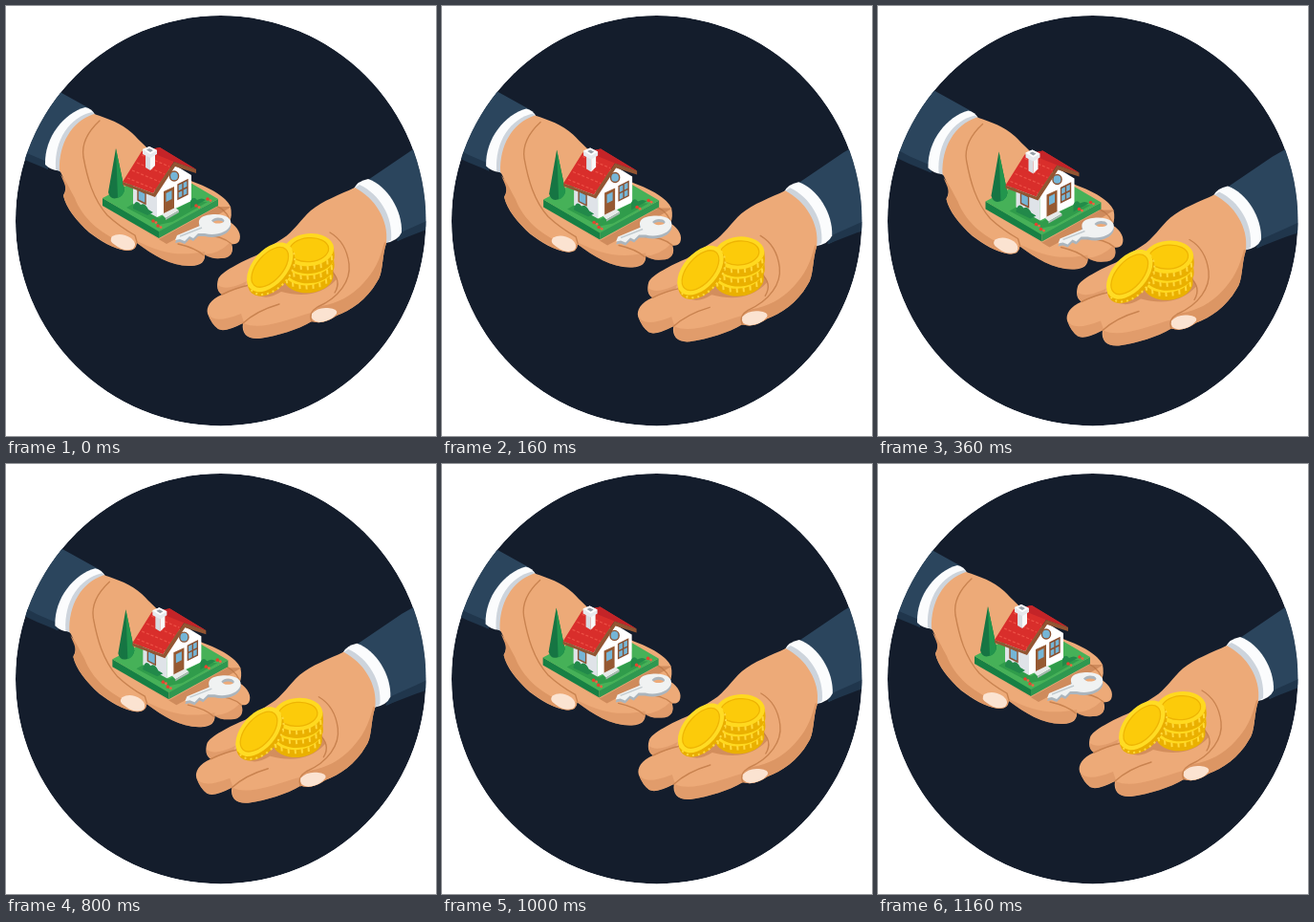
An HTML page for the animation above (1680 ms loop, 450 px wide and 450 px high).

```html
<!DOCTYPE html>
<html lang="en">
<head>
<meta charset="utf-8">
<title>House for coins</title>
<style>
  html, body { margin: 0; width: 100%; height: 100%; overflow: hidden; background: #fff; }
  svg { display: block; width: 100%; height: 100%; }
  .skin { fill: #edaa78; }
  .shade { fill: #dc9664; }
  .crease { fill: none; stroke: #c98350; stroke-width: 1.4; stroke-linecap: round; stroke-linejoin: round; }
  .nail { fill: #fbe3d1; }
  .sleeve { fill: #2b455d; }
  .fold { fill: #20364c; }
  .cuff { fill: #fbfcfd; }
  .cuff-in { fill: #cdd4dc; }
  .glass { fill: #75b5d6; stroke: #8a5030; stroke-width: 1.4; }
</style>
</head>
<body>
<svg viewBox="0 0 450 450">
  <defs>
    <clipPath id="disc"><circle cx="224.7" cy="224.7" r="214.7"/></clipPath>
    <g id="flat">
      <path d="M-26 0V8A26 17 0 0 0 26 8V0Z" fill="#eab000"/>
      <path d="M-23 13v4M-17 16v5M-10 19v5M-3 20v5M4 20v5M11 19v5M18 16v5M23 12v5" transform="translate(0 -4)" stroke="#ffd83a" stroke-width="2"/>
      <ellipse rx="26" ry="17" fill="#ffd91f"/>
      <ellipse rx="20.5" ry="12.5" fill="#fccb0a" stroke="#eeb403" stroke-width="1.3"/>
    </g>
    <g id="flower"><circle r="1.8" fill="#e5432f"/><circle cx="3" cy="1.6" r="1.4" fill="#f26440"/></g>
  </defs>

  <g clip-path="url(#disc)">
    <circle cx="224.7" cy="224.7" r="214.7" fill="#141d2c"/>

    <g id="seller">
      <path class="sleeve" d="M20 70L60 92 87 107C61 116 45 140 44 171L22 160 -6 145Z"/>
      <path class="fold" d="M-6 139L22 154 43 163 44 171 22 162 -6 149Z"/>
      <path class="cuff" d="M83 106C61 112 40 137 41 166Q48 173 57 172L94 115Q90 107 83 106Z"/>
      <path class="cuff-in" d="M90 111C67 116 50 140 52 171L58 174 96 116Z"/>
      <path class="skin" d="M92 113C107 118 120 122 132 133C148 149 172 174 196 184C213 190 231 200 235 210Q237 219 234 226C243 231 247 240 244 246Q241 250 236 249C239 256 236 264 225 264Q215 265 208 260C209 267 204 272 194 272C174 273 154 261 137 248Q136 257 126 256C112 254 99 246 87 237C75 226 62 211 60 198C65 190 61 181 56 172C55 145 68 121 92 113Z"/>
      <path class="shade" d="M57 176C61 186 65 191 60 199C65 215 79 231 92 240C104 249 119 256 128 256Q136 255 137 247Q129 251 119 246C99 238 80 222 72 201C66 190 63 183 57 176Z"/>
      <path class="shade" d="M137 246C160 257 178 263 208 257Q210 270 194 272C174 273 154 261 137 248ZM207 260Q222 260 235 247Q241 264 225 264Q214 265 207 260Z" opacity=".65"/>
      <path class="crease" d="M98 120C85 132 79 145 81 158C85 180 91 202 106 219Q119 231 135 240L137 247M180 249Q198 253 207 261M207 240Q226 240 236 249M214 207Q228 210 234 223"/>
      <path class="nail" d="M111 241Q120 236 131 243Q138 249 133 254Q124 258 114 250Q107 246 111 241Z"/>

      <path d="M103 210L160 244 221 210 236 210 200 232 168 249Z" fill="#b87345" opacity=".55"/>
      <path d="M101 201L160 235V243L101 209Z" fill="#178044"/>
      <path d="M160 235L222 202V209L160 243Z" fill="#2f9850"/>
      <path d="M101 201L164 168 222 202 160 236Z" fill="#46b158"/>
      <path d="M133 207L160 222 194 204 211 205 174 226 160 229 126 211Z" fill="#309c4b"/>
      <path d="M115 149L107 195Q109 203 116 201Q123 199 124 192Z" fill="#167543"/>
      <path d="M115 149L117 201Q123 199 124 192Z" fill="#22954d"/>

      <path d="M133 183L158 194V221L133 207Z" fill="#dfe3e8"/>
      <path d="M158 194L176 166 194 177V204L158 221Z" fill="#fff"/>
      <path class="glass" d="M138 192L146 196V207L138 203Z"/>
      <path d="M165 194L176 189V213L165 218Z" fill="#965932"/>
      <path d="M167.5 196L173.5 193V202L167.5 205Z" fill="#75b5d6"/>
      <path class="glass" d="M180 187L190 182V197L180 202ZM185 184.500V199.500M180 194.500L190 189.500"/>
      <ellipse class="glass" cx="176" cy="178" rx="4.600" ry="5"/>
      <path d="M163 218L177 211 181 214 167 222Z" fill="#e7e9e9"/>
      <path d="M167 222L181 214V216L167 224Z" fill="#aeb8b5"/>

      <path d="M122 184L142 152 161 148 199 171 176 163 154 196Z" fill="#d92e2b"/>
      <path d="M161 148L199 171 176 163 146 151Z" fill="#c42428"/>
      <path d="M127 180L156 192M132 172L161 184M137 164L166 176M142 156L171 168" stroke="#ed5146" stroke-width="1.2" stroke-dasharray="3 2"/>
      <path d="M122 184L154 196 176 163 199 171 199 175 177 168 156 200 122 187Z" fill="#925532"/>
      <path d="M146 154L151 157V172L146 169Z" fill="#d8dce1"/>
      <path d="M151 157L156 154V167L151 172Z" fill="#f8f8f8"/>
      <path d="M143 150L150 147 158 151V155L151 159 143 155Z" fill="#e7e9ed"/>
      <path d="M143 150L150 147 158 151 151 155Z" fill="#fff"/>
      <path d="M147 150.500L150 149 154 151 151 153Z" fill="#98a0a8"/>

      <path d="M133 210Q136 201 141 208Q145 205 149 213L154 216 148 219 133 212Z" fill="#22894a"/>
      <path d="M193 204Q196 198 200 203Q205 200 209 203L193 212Z" fill="#228b49"/>
      <use href="#flower" x="159" y="230"/><use href="#flower" x="154" y="225"/>
      <use href="#flower" x="199" y="209"/><use href="#flower" x="211" y="202"/>

      <g fill="#abb5bd" transform="translate(0 3)">
        <path id="key" fill-rule="evenodd" d="M203 230C199 222 207 218 219 218C231 218 237 223 235 229C232 237 219 241 208 238L201 238 196 243 192 241 187 246 182 244 177 245 179 240ZM215 224.500Q218 229 226 227Q231 225 226 222Q219 220 215 224.500Z"/>
      </g>
      <use href="#key" fill="#f0f2f2"/>
      <path d="M182 241L205 232" stroke="#c2cbd0" stroke-width="1.5"/>
    </g>

    <g id="buyer">
      <path class="sleeve" d="M370 188L426 150 470 125V222L440 231 410 246Q408 214 370 188Z"/>
      <path class="fold" d="M411 238L440 225 470 211V224L440 234 409 246Z"/>
      <path class="cuff" d="M364 191Q368 183 379 181C399 188 415 214 414 237Q410 246 397 248Z"/>
      <path class="cuff-in" d="M362 192L370 187C391 197 405 220 403 245L396 249Z"/>
      <path class="skin" d="M365 190C350 197 331 204 319 214C309 223 300 237 290 243L262 261C247 267 224 279 222 286C220 293 221 299 226 302C214 307 209 315 211 322Q215 333 222 338Q229 342 248 332C246 343 253 349 265 348C285 345 305 339 320 330Q332 334 346 324C360 319 378 307 388 289C395 280 393 263 398 248C401 224 386 201 365 190Z"/>
      <path class="shade" d="M396 247C391 267 385 278 374 290C361 304 347 311 330 314Q317 319 320 330Q332 334 346 324C360 319 378 307 388 289C395 280 393 263 398 248Z"/>
      <path class="shade" d="M249 332C265 340 292 329 319 321L320 330C305 339 285 345 265 348Q246 349 249 332ZM211 321Q216 334 246 322L249 331Q229 342 222 338Q215 333 211 321ZM222 292Q230 299 252 288L250 293 227 302Q220 298 222 292Z" opacity=".65"/>
      <path class="crease" d="M226 302Q240 295 255 292M248 332Q262 319 286 312M320 330Q316 321 326 315C349 305 361 287 359 270C357 254 351 244 339 237M339 276Q352 287 344 300"/>
      <path class="nail" d="M320 322Q326 315 337 316Q348 317 346 322Q340 330 328 331Q318 330 320 322Z"/>
      <path d="M257 295Q267 312 288 299Q325 309 346 286L338 266 285 275Z" fill="#bf7948" opacity=".55"/>
      <g transform="rotate(-5 319 265)">
        <use href="#flat" x="315" y="275"/>
        <use href="#flat" x="317" y="265"/>
        <use href="#flat" x="318" y="255"/>
      </g>
      <g transform="translate(277 274) rotate(-49)">
        <ellipse cx="-2" cy="2.500" rx="31" ry="19" fill="#e9ad00"/>
        <ellipse cx="-1" cy="2" rx="30" ry="19" fill="none" stroke="#ffd83a" stroke-width="2" stroke-dasharray="2 4"/>
        <ellipse cy="-1" rx="30.500" ry="18" fill="#ffdc24"/>
        <ellipse cy="-1" rx="25" ry="13.500" fill="#fccb0a" stroke="#efb604" stroke-width="1.300"/>
      </g>
    </g>
  </g>
</svg>
<script>
  const LOOP = 1680, STEP = 40, BACK = 800;
  const seller = document.getElementById('seller');
  const buyer = document.getElementById('buyer');

  // 0 = hands apart, 1 = hands together
  function closeness(t) {
    if (t < BACK) return Math.min(1, Math.floor(t / STEP) / 9);
    return Math.max(0, 1 - (Math.floor((t - BACK) / STEP) + 1) / 10);
  }

  function move(el, x, y) {
    el.setAttribute('transform', `translate(${x} ${y})`);
  }

  function draw() {
    const p = closeness(performance.now() % LOOP);
    move(seller, 11.5 * p, 3.5 * p);
    move(buyer, -13 * p, 7.5 * p);
    requestAnimationFrame(draw);
  }
  draw();
</script>
</body>
</html>
```
